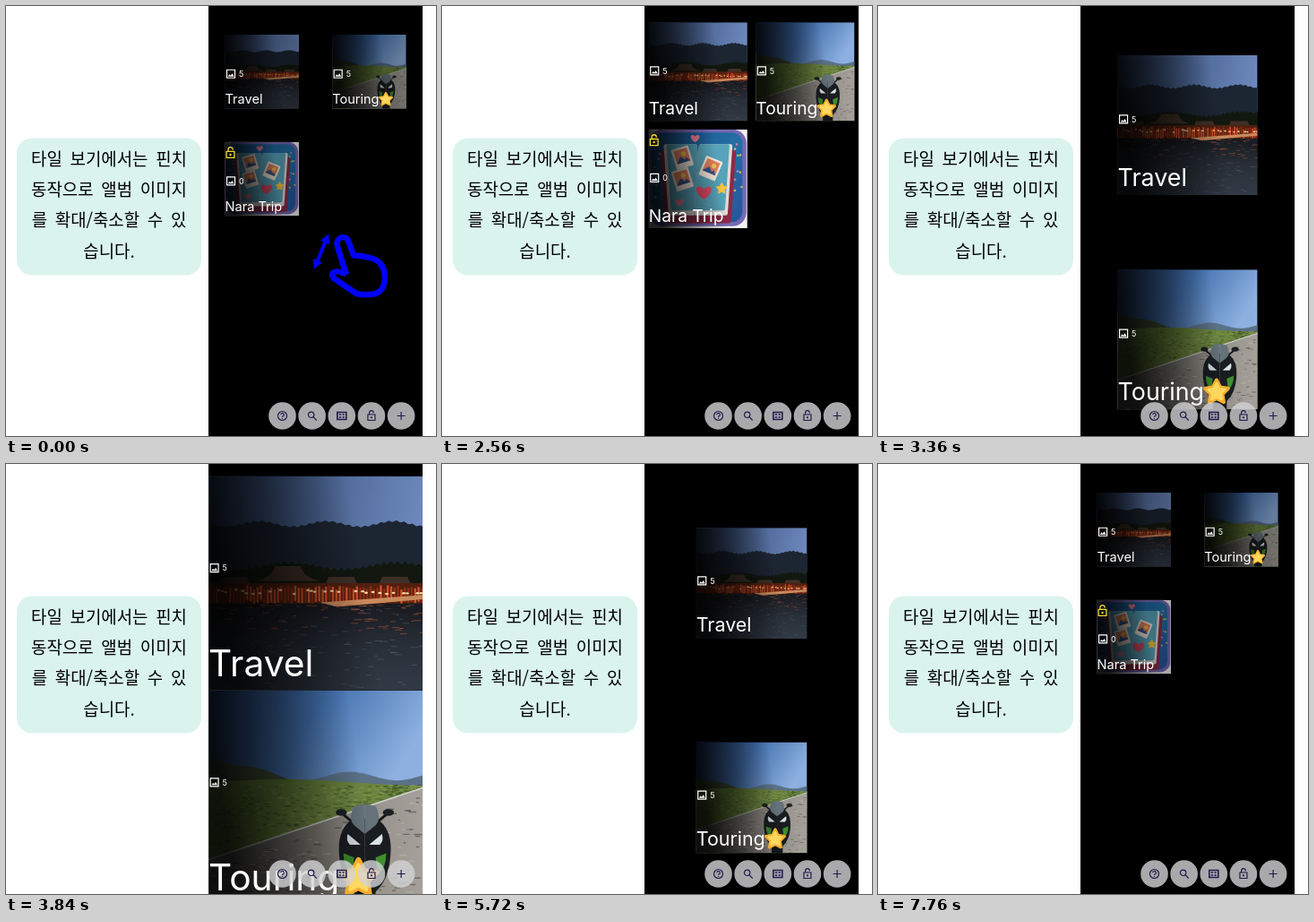
Write an HTML page with a canvas that moves like this. It is 480x480 px and loops after 8240 ms.

```html
<!DOCTYPE html>
<html lang="ko">
<head>
<meta charset="utf-8">
<style>
html, body { margin: 0; width: 100%; height: 100%; overflow: hidden; background: #fff; }
canvas { display: block; width: 480px; height: 480px; }
</style>
</head>
<body>
<canvas id="stage" width="480" height="480"></canvas>
<script>
const c = document.getElementById('stage').getContext('2d');
const { sin, cos, PI } = Math;
const LOOP = 8240, STEP = 40;
const PANEL = { x: 226, y: 13.5, w: 239.2 };
const REST = 82.5, HALF = 119, FULL = 239;

const clamp = v => Math.max(0, Math.min(1, v));
const mix = (a, b, u) => a + (b - a) * u;
const progress = (t, start, end) => clamp((t - start) / (end - start));

// Each pinch passes through the size at which the grid changes its column count
function sizeAt(t) {
  if (t < 2760) return mix(REST, HALF, progress(t, 2080, 2760) ** 0.8);
  if (t < 5000) return mix(HALF, FULL, progress(t, 2760, 3840) ** 2);
  if (t < 5750) return mix(FULL, HALF, progress(t, 5000, 5750));
  return mix(REST, HALF, (1 - progress(t, 5750, 6560)) ** 5);
}

function rng(seed) {
  return () => (seed = seed * 16807 % 2147483647) / 2147483647;
}

function at(x, y, k, angle, paint) {
  c.save();
  c.translate(x, y);
  c.rotate(angle);
  c.scale(k, k);
  paint();
  c.restore();
}

function rect(fill, x, y, w, h, r = 0) {
  c.fillStyle = fill;
  c.beginPath();
  c.roundRect(x, y, w, h, r);
  c.fill();
}

function disc(fill, x, y, rx, ry = rx) {
  c.fillStyle = fill;
  c.beginPath();
  c.ellipse(x, y, rx, ry, 0, 0, 2 * PI);
  c.fill();
}

function shape(fill, d) {
  c.fillStyle = fill;
  c.fill(new Path2D(d));
}

function line(color, width, d) {
  c.strokeStyle = color;
  c.lineWidth = width;
  c.stroke(new Path2D(d));
}

// Fills everything below the curve top(x)
function land(fill, top) {
  c.fillStyle = fill;
  c.beginPath();
  c.moveTo(0, 100);
  for (let x = 0; x <= 100; x++) c.lineTo(x, top(x));
  c.lineTo(100, 100);
  c.fill();
}

function gradient(x0, y0, x1, y1, ...colors) {
  const g = c.createLinearGradient(x0, y0, x1, y1);
  colors.forEach((color, i) => g.addColorStop(i / (colors.length - 1), color));
  return g;
}

function star(fill, x, y, r) {
  c.fillStyle = c.strokeStyle = fill;
  c.lineWidth = r * 0.25;
  c.lineJoin = 'round';
  c.beginPath();
  for (let i = 0; i < 10; i++) {
    const a = i * PI / 5 - PI / 2, d = r * (i % 2 ? 0.45 : 0.88);
    c.lineTo(x + d * cos(a), y + d * sin(a));
  }
  c.closePath();
  c.fill();
  c.stroke();
}

function heart(fill, x, y, r) {
  at(x, y, r, 0, () => shape(fill, 'M0 1C-2 -.3 -.8 -1.5 0 -.5C.8 -1.5 2 -.3 0 1'));
}

// Pictures fill a 100 x 100 square
function harbour() {
  const rand = rng(11);
  rect(gradient(0, 0, 100, 20, '#2c3c5c', '#4a6391', '#6d89bd'), 0, 0, 100, 40);
  land('#1c2532', x => 22.3 + 1.3 * sin(x / 5) + 0.4 * sin(x * 1.7));
  land('#12180f', x => 42 + 1.6 * sin(x / 8) + 0.7 * sin(x * 1.9));
  for (let i = 0; i < 4; i++) {
    const y = 47 - 5 * (i === 1);
    at(12 + i * 25, y, 1, 0, () => shape('#3f3027', 'M-15 7Q-7 5 -6 0H6Q7 5 15 7Z'));
  }
  rect('#51200f', 0, 50, 100, 10);
  for (let x = 0; x < 100; x += 1.6) {
    rect(rand() > 0.5 ? '#d4512a' : '#8d2f17', x, 51 + rand() * 2, 1, 7);
    if (rand() > 0.6) disc('#ffd9a0', x, 53 + rand() * 2, 0.8, 0.5);
  }
  rect(gradient(0, 60, 0, 100, '#191a20', '#29303a', '#323a45'), 0, 59.5, 100, 41);
  shape('#c98a5c', 'M52 59L100 55.5V57.5L60 61Z');
  for (let i = 0; i < 170; i++) {
    const depth = rand() ** 1.7;
    rect(depth < 0.35 && rand() > 0.4 ? '#b2583499' : '#8a98a840', rand() * 100, 60 + depth * 39, 1 + rand() * 3, 0.4);
  }
}

function motorbike() {
  rect('#15181a', -5, 14, 10, 20, 4);
  for (const side of [-1, 1]) {
    c.save();
    c.scale(side, 1);
    line('#15181a', 1.2, 'M4 -6L10 -11');
    disc('#1b2023', 11, -12, 2.6, 1.6);
    shape('#1a1d20', 'M0 -9L7 -8Q13 -3 12 8Q11 20 5 25H0Z');
    shape('#d9e2e6', 'M2 3L8 -2Q9 1 7 3Z');
    shape('#3f8f2e', 'M5 9L10 7Q10 14 6 17Z');
    shape('#65727a', 'M0 -2L5 -6Q8 -9 5 -15L0 -16Z');
    c.restore();
  }
}

function mountainRoad() {
  const rand = rng(5), edge = x => 79 - 0.335 * x;
  rect(gradient(0, 0, 80, 50, '#23406f', '#426fac', '#8db0e0'), 0, 0, 100, 60);
  land('#5a7187', x => 40 + 2 * cos(x / 7));
  land('#44523a', x => 31 + 0.26 * x + 0.8 * sin(x / 5));
  land(gradient(0, 40, 30, 75, '#7c9650', '#5e7b34', '#6c8440'), x => 43 - 1.5 * sin(x / 22));
  for (let i = 0; i < 350; i++) {
    const x = rand() * 100;
    rect(rand() > 0.5 ? '#92a85566' : '#33491f77', x, mix(44, edge(x), rand()), 2, 0.6);
  }
  land(gradient(0, 70, 100, 70, '#6a6866', '#86827c', '#a5a19a'), edge);
  for (let i = 0; i < 220; i++) {
    const x = rand() * 100, y = mix(edge(x) + 3, 100, rand());
    rect(rand() > 0.45 ? '#4b4a4899' : '#c4bfb566', x, y, 1 + rand() * 3, 0.6);
  }
  line('#cfd2cf', 0.7, 'M0 79L100 45.5');
  at(73, 69, 1, 0, motorbike);
}

function snapshot() {
  rect('#f4e9dc', -9, -10, 18, 21, 1);
  rect('#e1805f', -7, -8, 14, 13.5);
  disc('#f5c34c', 2, -3, 2.4);
  shape('#31548b', 'M-7 5.5L-2 -1L2 3L4 1L7 5.5Z');
}

function scrapbook() {
  const rand = rng(8);
  rect('#f2f1f5', 0, 0, 100, 100);
  rect('#7469b4', 0, 0, 99, 98, 14);
  rect(gradient(0, 0, 100, 100, '#174a83', '#236fa5', '#28519a'), 3, 3, 92, 91, 11);
  for (const side of [-1, 1]) {
    c.save();
    c.transform(side, 0, -0.07 * side, 1, 50 + side, 15);
    rect('#8f2945', 0, 6, 38, 74, 3);
    rect('#dfdcd8', 0, 0, 34, 72, 2);
    rect('#58a3ba', 0, 0, 31, 67, 2);
    c.restore();
  }
  for (let i = 0; i < 3; i++) at(34 + 29 * (i % 2), 28 + 11 * i, 1, -0.3 + 0.7 * (i % 2), snapshot);
  heart('#e14b66', 56, 64, 7);
  heart('#ec7d95', 47, 9, 4);
  heart('#ec7d95', 31, 74, 4);
  star('#f5c33d', 74, 60, 6);
  for (let i = 0; i < 18; i++) {
    star(i % 3 ? '#f3c653' : '#f08da2', (i % 2 ? 87 : 5) + rand() * 8, 7 + rand() * 82, 1.4);
  }
}

const ALBUMS = [
  { title: 'Travel', count: 5, picture: harbour },
  { title: 'Touring', count: 5, picture: mountainRoad, starred: true },
  { title: 'Nara Trip', count: 0, picture: scrapbook, locked: true }
];

function lock(color) {
  line(color, 1.2, 'M-4 -1.5H4V5H-4ZM-2.3 -1.5V-3.5A2.3 2.3 0 0 1 2.3 -3.5V-3');
  disc(color, 0, 1.8, 1.1);
}

function imageIcon() {
  line('#fff', 1.2, 'M-4.5 -4.5H4.5V4.5H-4.5Z');
  shape('#fff', 'M-3.3 3L-1.5 .6L-.2 2L1.5 -.4L3.5 3Z');
}

function tile(album, cx, cy, s) {
  const x = cx - s / 2, y = cy - s / 2, bottom = y + s;
  c.save();
  c.beginPath();
  c.rect(x, y, s, s);
  c.clip();
  at(x, y, s / 100, 0, () => {
    album.picture();
    rect(gradient(0, 10, 65, 0, '#000d', '#0007', '#0000'), 0, 0, 100, 100);
    rect(`rgba(0,0,0,${0.3 * progress(s, 110, REST)})`, 0, 0, 100, 100);
  });
  c.restore();

  if (album.locked) at(x + 6, y + 12.3, 1.1, 0, () => lock('#f2d52c'));
  const iconY = bottom - 0.624 * s + 12.7;
  at(x + 6.5, iconY, 1, 0, imageIcon);
  c.fillStyle = '#fff';
  c.textAlign = 'left';
  c.font = '9px Inter, sans-serif';
  c.fillText(album.count, x + 15.5, iconY + 3.2);

  const size = 0.8 + 0.167 * s, base = bottom - 0.066 * s;
  c.font = `${size}px Inter, sans-serif`;
  c.fillText(album.title, x, base);
  if (album.starred) {
    const starX = x + c.measureText(album.title).width + size * 0.52, starY = base - size * 0.33;
    star('#f4ad2e', starX, starY, size * 0.58);
    star('#ffd75e', starX, starY, size * 0.42);
  }
}

function tiles(s) {
  const cols = s < HALF ? 2 : 1, cell = PANEL.w / cols;
  ALBUMS.forEach((album, i) => {
    const col = i % cols, row = Math.floor(i / cols);
    tile(album, PANEL.x + cell * (col + 0.5), PANEL.y + cell * (row + 0.5), s);
  });
}

const INK = '#211b4c';
const BUTTONS = [
  () => line(INK, 1.2, 'M5 0A5 5 0 1 1 -5 0A5 5 0 1 1 5 0M-1.8 -1.2A1.8 1.8 0 1 1 .9 .3Q0 .8 0 1.6M0 2.6V3.6'),
  () => line(INK, 1.2, 'M2.2 -1.2A3.2 3.2 0 1 1 -4.2 -1.2A3.2 3.2 0 1 1 2.2 -1.2M1.3 1.2L5 5'),
  () => line(INK, 1.6, 'M-5 -4H5V4H-5ZM-3 -1.5H-.7M.7 -1.5H3M-3 1.5H-.7M.7 1.5H3'),
  () => lock(INK),
  () => line(INK, 1.2, 'M-4.5 0H4.5M0 -4.5V4.5')
];

function buttons() {
  BUTTONS.forEach((icon, i) => at(308.5 + i * 33.15, 457.5, 1, 0, () => {
    disc('rgba(212,212,214,.8)', 0, 0, 15.3);
    c.lineJoin = 'miter';
    icon();
  }));
}

function hand(t) {
  c.save();
  c.globalAlpha = 1 - progress(t, 1000, 1480);
  c.lineJoin = 'round';
  at(384, 290.5, 1 + 0.5 * progress(t, 520, 1320), 0, () => {
    line('#00f', 6.5, 'M-4 9.5L-14 -22C-17 -33 -4 -37 -1 -26L4 -12' +
      'C14 -12 29 -9 33 -4C42 6 41 26 29 30.5Q18 33 7 30.5L-18 13.5C-23 8 -17 2 -4 9.5');
    at(-32, -16.5, 1, 0.39, () => {
      line('#00f', 4, 'M0 -14V14');
      for (const turn of [0, PI]) at(0, 0, 1, turn, () => shape('#00f', 'M0 -21L-5.5 -11H5.5Z'));
    });
  });
  c.restore();
}

function caption() {
  rect('#daf4ed', 12, 147.5, 206, 153, 17);
  c.fillStyle = '#000';
  c.textAlign = 'center';
  c.font = '500 18.9px "Noto Sans CJK KR", "Noto Sans CJK", sans-serif';
  c.wordSpacing = '4.5px';
  ['타일 보기에서는 핀치', '동작으로 앨범 이미지', '를 확대/축소할 수 있', '습니다.']
    .forEach((str, i) => c.fillText(str, 115, 177.7 + i * 34.3));
  c.wordSpacing = '0px';
}

function draw(now) {
  const t = Math.floor(now % LOOP / STEP) * STEP;
  rect('#fff', 0, 0, 480, 480);
  caption();
  c.save();
  c.beginPath();
  c.rect(PANEL.x, 0, PANEL.w, 480);
  c.clip();
  rect('#000', PANEL.x, 0, PANEL.w, 480);
  tiles(sizeAt(t));
  buttons();
  if (t < 1480) hand(t);
  c.restore();
}

const start = performance.now();
function frame() {
  draw(performance.now() - start);
  requestAnimationFrame(frame);
}
frame();
</script>
</body>
</html>
```
